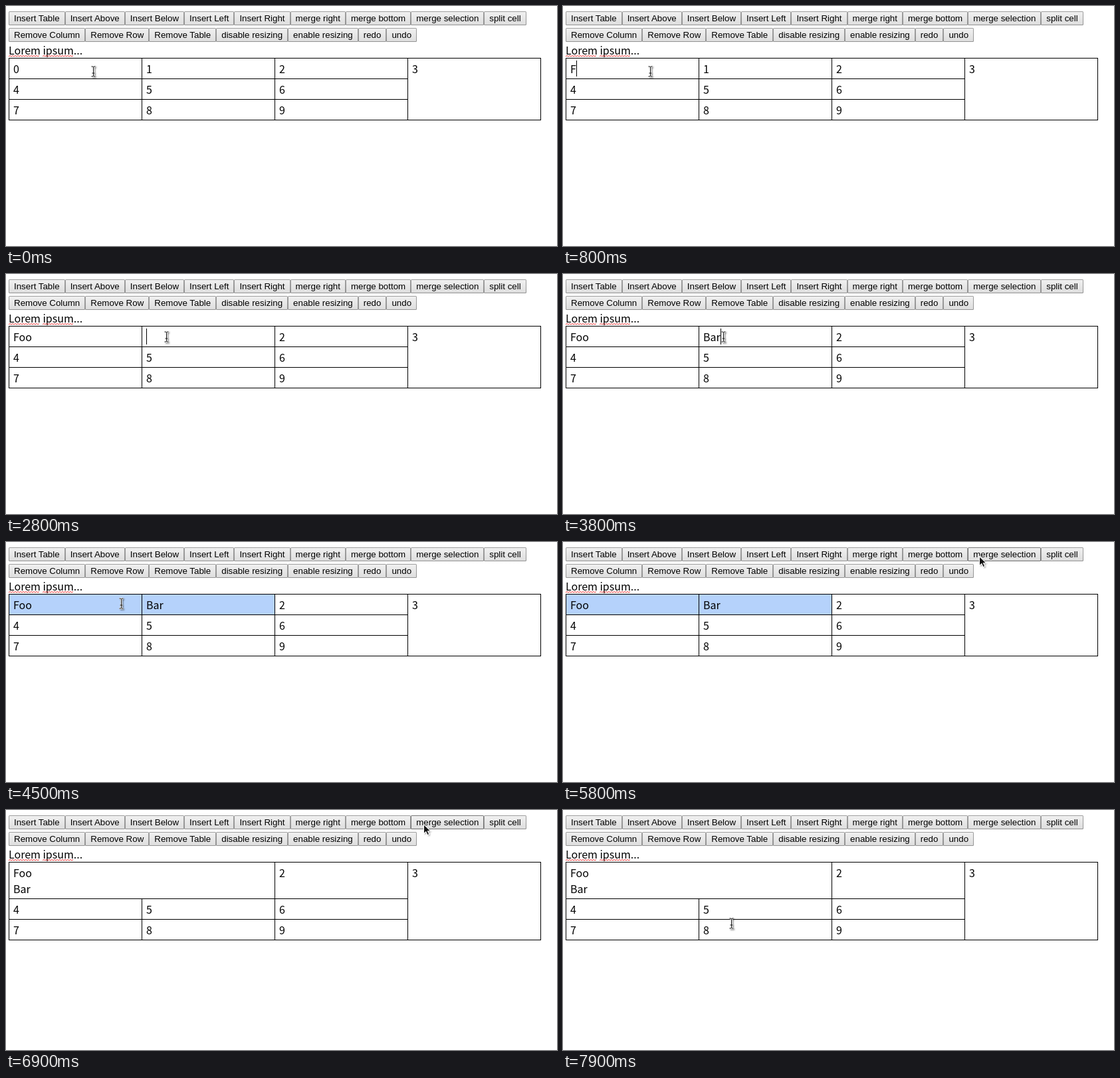
Recreate the animation shown at these times as an HTML page. Size 829 by 361 pixels, loop 8 s.

```html
<!DOCTYPE html>
<html lang="en">
<head>
<meta charset="utf-8">
<title>Table editor</title>
<style>
  html, body { margin: 0; width: 100%; height: 100%; overflow: hidden; background: #fff; }
  .bar { position: absolute; left: 4px; display: flex; white-space: pre; }
  .btn {
    flex: none; height: 21px; padding: 0 8px; border-radius: 1.5px;
    font: 13.3333px/21px "Liberation Sans", Arial, sans-serif; color: #000;
    background: linear-gradient(#f1f1f1, #ddd);
    box-shadow: inset 0 0 0 1px rgba(0, 0, 0, .34);
  }
  .btn.hover { box-shadow: inset 0 0 0 1px rgba(0, 0, 0, .5); }
  .btn.press { background: linear-gradient(#ccc, #ddd); }
  svg { position: absolute; left: 0; top: 0; }
  text { font: 16px "Noto Sans CJK SC", "Noto Sans CJK JP", "Noto Sans CJK", "Noto Sans", sans-serif; white-space: pre; }
</style>
</head>
<body>
<div id="top" class="bar" style="top:8px"></div>
<div id="bottom" class="bar" style="top:33px"></div>
<svg width="829" height="361" viewBox="0 0 829 361">
  <defs>
    <filter id="blur" x="-50%" y="-50%" width="200%" height="200%"><feGaussianBlur stdDeviation="1"/></filter>
    <path id="beamShape" d="M-3-7.5H-1.5Q0-7.5 0-6Q0-7.5 1.5-7.5H3M0-6V6M-3 7.5H-1.5Q0 7.5 0 6Q0 7.5 1.5 7.5H3M-2 2.5H2"/>
    <path id="arrowShape" d="M0 0V14.2L3.3 11.2L5.7 16.3L8.3 15.1L6 10.2H10.3Z"/>
  </defs>
  <text x="4" y="73">Lorem ipsum...</text>
  <path id="squiggle" fill="none" stroke="#e33" stroke-width="1"/>
  <g id="table"></g>
  <rect id="caret" y="82" width="1" height="24"/>
  <g id="beam" fill="none">
    <use href="#beamShape" x="1.5" y="1.5" stroke="#000" stroke-opacity=".45" stroke-width="2.5" filter="url(#blur)"/>
    <use href="#beamShape" stroke="#fff" stroke-width="2.6"/>
    <use href="#beamShape" stroke="#111" stroke-width="1"/>
  </g>
  <g id="arrow">
    <use href="#arrowShape" x="1.5" y="1.5" fill-opacity=".4" filter="url(#blur)"/>
    <use href="#arrowShape" fill="#111" stroke="#fff" stroke-width="1.1"/>
  </g>
</svg>
<script>
const LOOP = 8000;
const $ = id => document.getElementById(id);

const addButtons = (id, labels) => {
  $(id).innerHTML = labels.map(label => `<span class="btn">${label}</span>`).join('');
};
addButtons('top', ['Insert Table', 'Insert Above', 'Insert Below', 'Insert Left', 'Insert Right',
  'merge right', 'merge bottom', 'merge selection', 'split cell']);
addButtons('bottom', ['Remove Column', 'Remove Row', 'Remove Table', 'disable resizing',
  'enable resizing', 'redo', 'undo']);
const mergeButton = $('top').children[7];

const wave = (from, to) => {
  let d = `M${from} 76`;
  for (let x = from + 2, up = true; x <= to; x += 2, up = !up) d += `L${x} ${up ? 74.5 : 76}`;
  return d;
};
$('squiggle').setAttribute('d', wave(4, 51) + wave(55, 102));

// Each entry changes part of the state from its time on.
const beamAt = (x, y) => ({ beam: [x, y], arrow: null });
const arrowAt = (x, y, hover) => ({ arrow: [x, y], beam: null, hover });
const steps = [
  [0, { first: '0', second: '1', caret: null, selected: false, merged: false,
        hover: false, press: false, ...beamAt(131, 98) }],
  [100, { caret: 20 }],
  [400, { first: '', caret: 11 }],
  [800, { first: 'F', caret: 20 }],
  [1100, { first: 'Fo', caret: 29 }],
  [1200, { first: 'Foo', caret: 39 }],
  [1700, beamAt(161, 98)],
  [1800, beamAt(188, 97)],
  [1900, beamAt(209, 96)],
  [2000, beamAt(225, 95)],
  [2100, beamAt(236, 94)],
  [2200, beamAt(242, 94)],
  [2300, beamAt(241, 94)],
  [2400, { caret: 220 }],
  [2800, { second: '', caret: 211 }],
  [3400, { second: 'B', caret: 222 }],
  [3600, { second: 'Ba', caret: 231 }],
  [3800, { second: 'Bar', caret: 237 }],
  [4400, beamAt(218, 94)],
  [4500, { ...beamAt(173, 92), selected: true, caret: null }],
  [4600, beamAt(162, 92)],
  [4700, beamAt(158, 92)],
  [5300, { beam: null }],
  [5600, arrowAt(634, 0, false)],
  [5700, arrowAt(629, 13, true)],
  [5800, arrowAt(626, 21, true)],
  [5900, arrowAt(626, 26, true)],
  [6000, arrowAt(627, 29, false)],
  [6300, arrowAt(627, 26, true)],
  [6400, arrowAt(628, 23, true)],
  [6500, arrowAt(628, 21, true)],
  [6800, { press: true }],
  [6900, { press: false, selected: false, merged: true }],
  [7200, { arrow: null, hover: false }],
  [7300, beamAt(244, 116)],
  [7500, beamAt(249, 141)],
  [7600, beamAt(253, 163)],
  [7700, beamAt(254, 170)],
  [7900, beamAt(253, 170)],
];

const rect = (x, y, w, h, fill = '#000') => `<rect x="${x}" y="${y}" width="${w}" height="${h}" fill="${fill}"/>`;
const hline = (y, x1, x2) => rect(x1, y, x2 - x1, 1);
const vline = (x, y1, y2) => rect(x, y1, 1, y2 - y1);
const cell = (col, top, label) => `<text x="${11 + col * 200}" y="${top + 23}">${label}</text>`;

function tableMarkup({ first, second, selected, merged }) {
  const row2 = merged ? 133 : 109, row3 = row2 + 31, end = row3 + 31;
  let out = '';
  if (selected) out += rect(5, 79, 400, 30, '#b5d2fb');
  out += hline(78, 4, 805) + hline(row2, 4, 605) + hline(row3, 4, 605) + hline(end, 4, 805);
  out += vline(4, 78, end) + vline(204, merged ? row2 : 78, end);
  for (const x of [404, 604, 804]) out += vline(x, 78, end);
  out += cell(0, 78, first) + (merged ? cell(0, 102, second) : cell(1, 78, second));
  out += cell(2, 78, '2') + cell(3, 78, '3');
  for (let col = 0; col < 3; col++) out += cell(col, row2, 4 + col) + cell(col, row3, 7 + col);
  return out;
}

function place(node, pos) {
  node.style.display = pos ? '' : 'none';
  if (pos) node.setAttribute('transform', `translate(${pos[0] + .5} ${pos[1] + .5})`);
}

let shown = -1;
function render(time) {
  const count = steps.filter(([start]) => start <= time).length;
  if (count === shown) return;
  shown = count;
  const state = Object.assign({}, ...steps.slice(0, count).map(step => step[1]));
  $('table').innerHTML = tableMarkup(state);
  $('caret').style.display = state.caret === null ? 'none' : '';
  $('caret').setAttribute('x', state.caret ?? 0);
  place($('beam'), state.beam);
  place($('arrow'), state.arrow);
  mergeButton.classList.toggle('hover', state.hover);
  mergeButton.classList.toggle('press', state.press);
}

const begin = performance.now();
function tick() {
  render((performance.now() - begin) % LOOP);
  requestAnimationFrame(tick);
}
tick();
</script>
</body>
</html>
```
